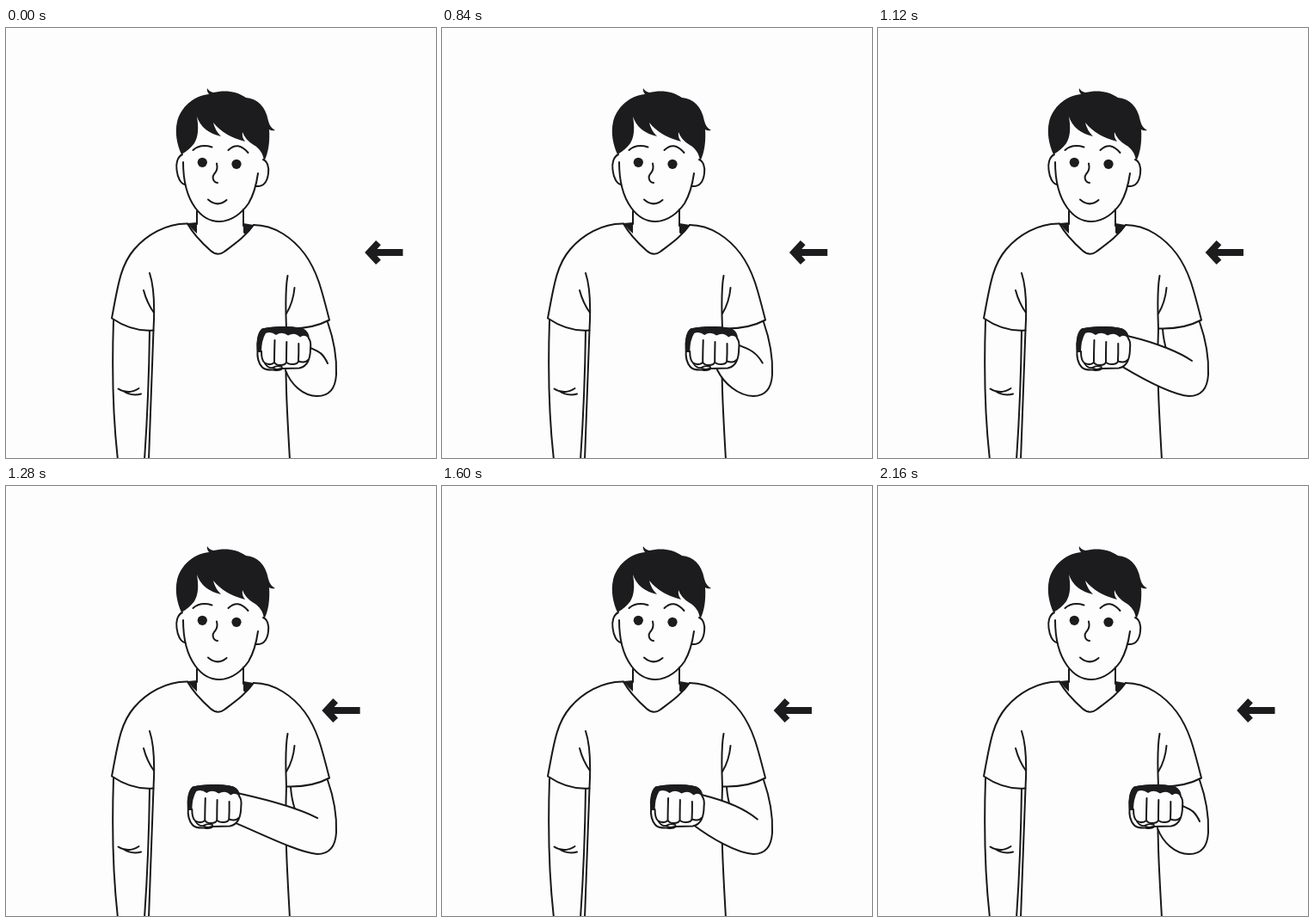
An HTML page with a canvas for the animation above (3000 ms loop, 500 by 500 pixels).

```html
<!DOCTYPE html>
<html lang="en">
<head>
<meta charset="utf-8">
<title>Fist moving sideways</title>
<style>
html, body { margin: 0; width: 100%; height: 100%; overflow: hidden; background: #fdfdfd; }
canvas { display: block; width: 500px; height: 500px; }
</style>
</head>
<body>
<canvas id="stage"></canvas>
<script>
const PAPER = '#fdfdfd', INK = '#18181a', SOLID = '#1c1c1e';
const LOOP = 3000, STEP = 40, PEAK = 1330;

const canvas = document.getElementById('stage');
const ctx = canvas.getContext('2d');
const ratio = window.devicePixelRatio || 1;
canvas.width = canvas.height = 500 * ratio;
ctx.scale(ratio, ratio);
ctx.lineCap = ctx.lineJoin = 'round';

function line(d, width = 2) {
  ctx.lineWidth = width;
  ctx.strokeStyle = INK;
  ctx.stroke(new Path2D(d));
}

function fill(d, color = SOLID) {
  ctx.fillStyle = color;
  ctx.fill(new Path2D(d));
}

function dot(x, y, r) {
  ctx.beginPath();
  ctx.arc(x, y, r, 0, Math.PI * 2);
  ctx.fillStyle = SOLID;
  ctx.fill();
}

function drawHead() {
  // ears, face, neck
  line('M205 147C199 150 197.5 158 198.5 165C199.5 174 203 181 208 182');
  line('M299 153C304 155 306 162 305 169C304 179 299 185 291 184');
  line('M206 156C206 180 212 198 220 209C228 220 237 225 248 225C263 225 275 214 282 204C288 194 291 183 293 169');
  line('M222 213V228M276 211V230');
  // hair
  fill('M204 147C199 136 196 122 199 109C203 93 217 79 236 77Q233 73 234 70Q236 74 241 75' +
       'C254 72 268 73 279 81C292 82 302 91 305 108Q307 116 313 119Q309 120 306 118' +
       'C307 132 305 146 300 155C299 146 295 140 288 136Q278 130 275 121Q274 127 278 132' +
       'Q254 126 241 110Q243 119 250 126Q228 121 222 103C224 115 224 126 219 134Q213 142 204 147Z');
  // features
  dot(228.3, 156.3, 5.6);
  dot(268, 158.3, 5.6);
  line('M217.5 142Q226 134.5 239.5 138.5');
  line('M258.5 142Q269.5 131 281.5 145');
  line('M245 157.5Q246.5 164 243.5 168Q239.5 172 241 176Q242 179.5 246 180');
  line('M235 199.5Q246 209 256.5 200');
}

function drawBody() {
  fill('M211 227L222 226V239Q216 234 211 227Z');
  fill('M276 227L288 229Q283 236 278 240L276 238Z');
  line('M211 227.5C218 240 229 251 238 259Q246 266 254 260C266 251 279 242 288 229');
  // left side
  line('M211 227.5C186 227 163 241 149 257.5C133 276 130 300 123 337.5C137 347 153 353 171.5 351.5');
  line('M167 285C173 303 173 325 171.5 351L166 502');
  line('M160 305Q164 320 172 331');
  line('M125 340C123 400 124 450 130 502');
  line('M167 352Q166 430 161 502');
  line('M130.5 419.5Q142 427 154.5 419M136 422Q146 428.5 157 425.5');
  // right side
  line('M288 229C313 229 334 245 347.5 263C362 283 367 304 376 339.5C360 348 343 350 327 349.5');
  line('M327.5 288C324.5 304 325 325 326 350C324 400 327 450 330 502');
  line('M335.5 302Q334 319 326 332');
}

function drawArm(d) {
  const k = d / 82;
  const ux = 354 - d, uy = 358 + 14 * (1 - k) ** 2.2;
  const ex = 374 - 12 * k, ey = 390 - 4 * k;
  const upper = `M${ux - 12} ${uy - 4 + k}L${ux} ${uy}` +
    `C${ux + (ex - ux) * 0.45} ${uy + 4 + 5 * k} ${ex - 6 - 10 * k} ${ey - 13 + 5 * k} ${ex} ${ey}`;
  const lx = 325 - 46 * k - 15 * k * k, ly = 398 - 7 * k;
  const lower = `C${345 - 5 * k} ${428 - 2 * k} ${331 - 31 * k} ${414 - 8 * k} ${lx} ${ly}`;

  line('M331 350Q332 364 336 376');
  fill(`${upper}L384 400C384 420 375 428 362 428${lower}Z`, PAPER);
  line(upper);
  line('M374 342C381 362 385 380 384 403C383 420 375 428 362 428' + lower);
}

function drawFist(d) {
  ctx.save();
  ctx.translate(-d, 0);
  const hand = 'M292.5 375C291.5 365 293.5 354 298 350.5C310 347 334 347 345 350.5Q351 353 352 361' +
    'Q355 364 354 373Q354 382 351 388Q348 394 341 395.5L321 396Q318 399 311 397.5Q301 398 297.5 394Q291.5 387 292.5 375Z';
  fill(hand, PAPER);
  line(hand);
  // back of the hand above the knuckles
  fill('M292 377C291 363 293 353 298 349.5C312 346 336 346 345 349.5Q352 353 352 361' +
    'Q347 355.5 342 359.5Q336 353 328 357.5Q321 352.5 314 357Q308 352.5 302 355Q297 363 297 377Z');
  // fingers
  line('M297 376Q297 387 301 389.5Q307 393 312 389Q314 392 319 392Q325 392 326 388.5' +
    'Q328 391 333 391Q339 391 340 387.5Q348 390 351 386');
  line('M312.5 363Q312 378 312 389M326.3 365Q326 379 326 388M340.3 367Q340.5 378 340 387');
  // thumb
  line('M301 390Q305 396 310 395Q315 392 321 394L320 397M310 395Q314 398 319 396', 1.7);
  ctx.restore();
}

function drawArrow(shift) {
  ctx.save();
  ctx.translate(-shift, 0);
  ctx.lineCap = 'butt';
  ctx.lineJoin = 'miter';
  ctx.strokeStyle = SOLID;
  ctx.lineWidth = 7.8;
  ctx.beginPath();
  ctx.moveTo(433, 249.7);
  ctx.lineTo(422.5, 261);
  ctx.lineTo(433, 272.3);
  ctx.moveTo(423, 261);
  ctx.lineTo(461.5, 261);
  ctx.stroke();
  ctx.restore();
}

function draw(t) {
  const away = Math.abs(t - PEAK);
  const swing = 41 * (1 + Math.cos(Math.PI * Math.min(1, away / 622)));
  const slide = 54 * Math.max(0, 1 - away / 650);
  ctx.fillStyle = PAPER;
  ctx.fillRect(0, 0, 500, 500);
  drawHead();
  drawBody();
  drawArm(swing);
  drawFist(swing);
  drawArrow(slide);
}

const start = performance.now();
function tick() {
  const t = (performance.now() - start) % LOOP;
  draw(Math.floor(t / STEP) * STEP);
  requestAnimationFrame(tick);
}
tick();
</script>
</body>
</html>
```
